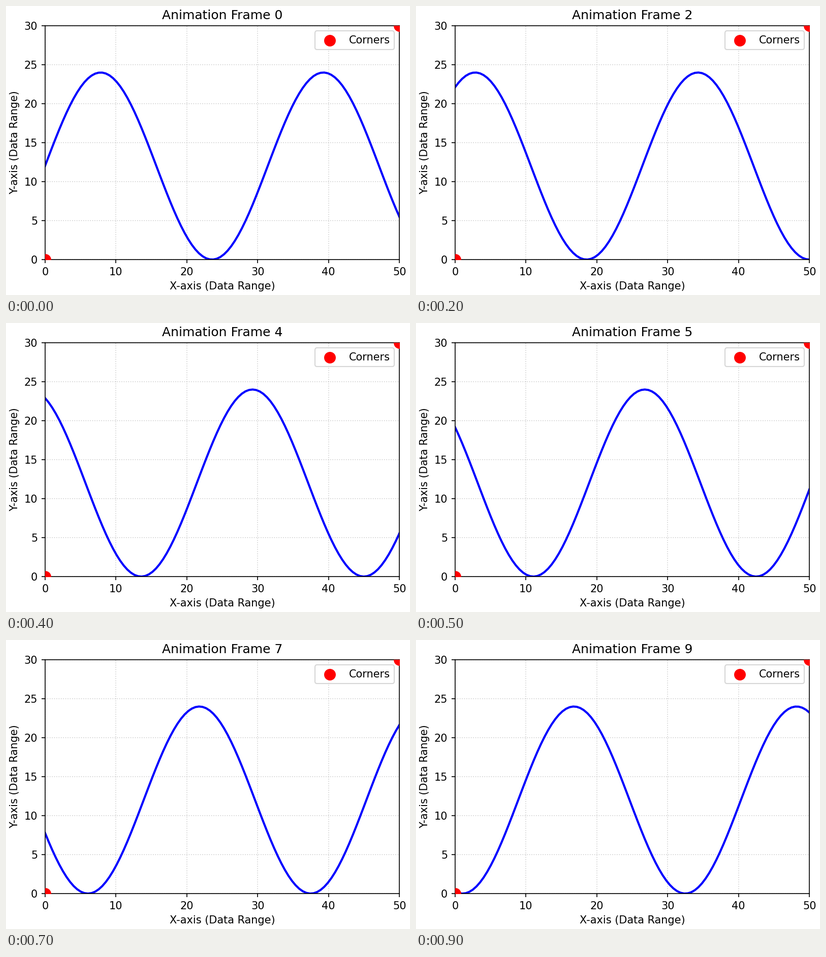
Recreate the animation shown at these times as a matplotlib script. Size 795 by 571 pixels, loop 1 s.

```python
import matplotlib.pyplot as plt
import numpy as np
from matplotlib.animation import FuncAnimation

WIDTH, HEIGHT, DPI = 795, 571, 150
LEFT, BOTTOM, AXES_W, AXES_H = 76.75, 70, 697.5, 462
X_MAX, Y_MAX = 50, 30
FRAMES, INTERVAL = 10, 100

x = np.linspace(0, X_MAX, 100)


def wave(frame):
    return 12 + 12 * np.sin(0.2 * x + 0.5 * frame)


fig = plt.figure(figsize=(WIDTH / DPI, HEIGHT / DPI), dpi=DPI)
ax = fig.add_axes([LEFT / WIDTH, BOTTOM / HEIGHT, AXES_W / WIDTH, AXES_H / HEIGHT])
ax.set(xlim=(0, X_MAX), ylim=(0, Y_MAX),
       xlabel="X-axis (Data Range)", ylabel="Y-axis (Data Range)")
ax.grid(True, linestyle=":", alpha=0.6)

line, = ax.plot(x, wave(0), color="blue", linewidth=2)
ax.scatter([0, X_MAX], [0, Y_MAX], color="red", s=100, zorder=5, label="Corners")
ax.legend(loc="upper right")
title = ax.set_title("Animation Frame 0")


def update(frame):
    line.set_ydata(wave(frame))
    title.set_text(f"Animation Frame {frame}")
    return line, title


anim = FuncAnimation(fig, update, frames=FRAMES, interval=INTERVAL,
                     repeat=True, repeat_delay=0, blit=False)
plt.show()
```
